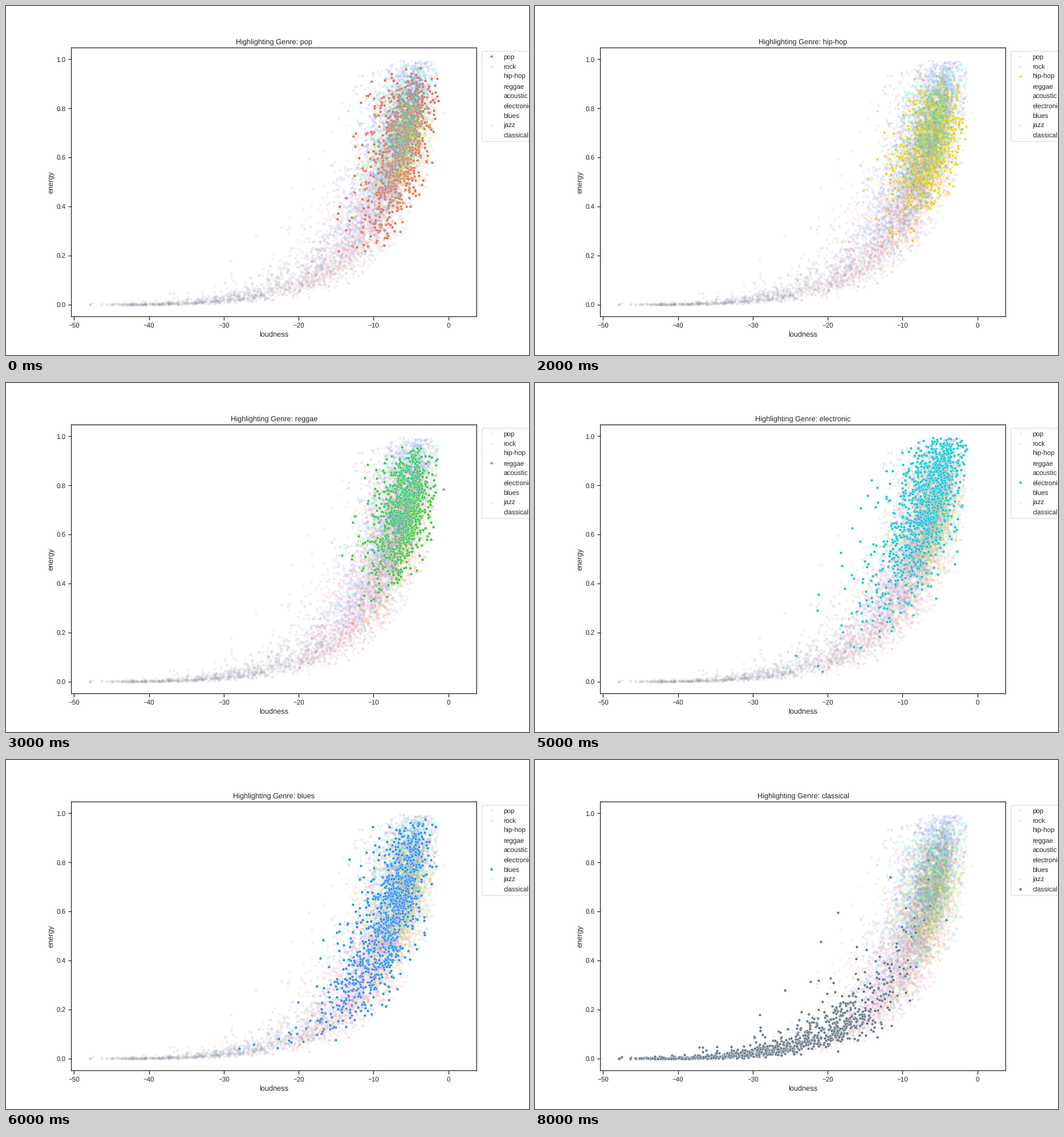
Animation of 917x611 px, one loop 9000 ms. Source, as a matplotlib script:

```python
import numpy as np
import matplotlib.pyplot as plt
from matplotlib.animation import FuncAnimation
from matplotlib.lines import Line2D

DPI = 64
K = 76.4 / DPI  # type and line scale
INK = "0.15"
DOT = 4.6 * K
EDGE = 0.42 * K

plt.rcParams.update({
    "font.family": "Liberation Sans", "text.hinting": "none", "path.snap": False,
    "text.color": INK, "axes.labelcolor": INK, "axes.edgecolor": INK,
    "xtick.color": INK, "ytick.color": INK,
    "axes.linewidth": 1.25 * K, "axes.titlesize": 12 * K,
    "axes.labelsize": 12 * K, "axes.titlepad": 6 * K, "axes.labelpad": 4 * K,
    "legend.fontsize": 11 * K, "legend.labelspacing": 0.513, "patch.linewidth": K,
})
for t in ("xtick", "ytick"):
    plt.rcParams.update({
        f"{t}.labelsize": 11 * K, f"{t}.major.size": 6 * K,
        f"{t}.major.width": 1.25 * K, f"{t}.major.pad": 3.5 * K,
    })

# name: colour, mean energy, concentration, loudness shift, spread
GENRES = {
    "pop": ("tomato", 0.65, 8, 2.8, 1.5),
    "rock": ("#7f24d8", 0.70, 4.5, -0.5, 1.7),
    "hip-hop": ("gold", 0.64, 14, 2.2, 1.4),
    "reggae": ("limegreen", 0.69, 12, 2.8, 1.4),
    "acoustic": ("peru", 0.43, 5, 0.8, 1.6),
    "electronic": ("darkturquoise", 0.70, 5, -0.5, 1.9),
    "blues": ("dodgerblue", 0.55, 4.5, 0, 1.7),
    "jazz": ("hotpink", 0.38, 4, -0.4, 1.8),
    "classical": ("#66788a", 0.10, 5, -3, 2),
}
NAMES = list(GENRES)


def tracks(rng, mean, conc, shift, spread, count=950):
    """Loudness grows with the log of energy, bounded by a soft right edge."""
    energy = 0.995 * rng.beta(mean * conc, (1 - mean) * conc, count)
    noise = rng.standard_t(7, count).clip(-4, 4)
    noise *= np.where(noise < 0, 1.2, 0.85) * spread * (1.35 - 0.5 * energy)
    loud = 6 * np.log(energy + 0.003) - 4.3 + shift * (1 - energy) + noise
    edge = -1.2 - 17 * np.exp(-4 * energy) + rng.exponential(0.3, count)
    return np.maximum(edge - np.abs(edge - loud), -47.9), energy


fig, ax = plt.subplots(figsize=(917 / DPI, 611 / DPI), dpi=DPI, facecolor="white")
fig.subplots_adjust(left=0.125, right=0.9, bottom=0.11, top=0.88)
ax.set(xlim=(-50.36, 3.79), ylim=(-0.0491, 1.0463), xlabel="loudness", ylabel="energy")

rng = np.random.default_rng(7)
clouds = [ax.scatter(*tracks(rng, *shape), s=DOT**2, color=color,
                     linewidths=EDGE, edgecolors="white")
          for color, *shape in GENRES.values()]
keys = [Line2D([], [], ls="", marker="o", ms=DOT, mew=EDGE, mec="white", label=name)
        for name in NAMES]
legend = ax.legend(handles=keys, loc="upper left", bbox_to_anchor=(1.005, 1))
title = ax.set_title("")


def update(i):
    title.set_text(f"Highlighting Genre: {NAMES[i]}")
    for j, (name, cloud, key) in enumerate(zip(NAMES, clouds, legend.legend_handles)):
        lit = i == j
        cloud.set_alpha(1 if lit else 0.11)
        key.set_markerfacecolor(GENRES[name][0] if lit else "#efe8ef")
        key.set_visible(lit or name in ("pop", "rock", "jazz"))
    return [title, *clouds]


anim = FuncAnimation(fig, update, frames=len(NAMES), interval=1000,
                     repeat=True, repeat_delay=0, blit=False)
plt.show()
```
